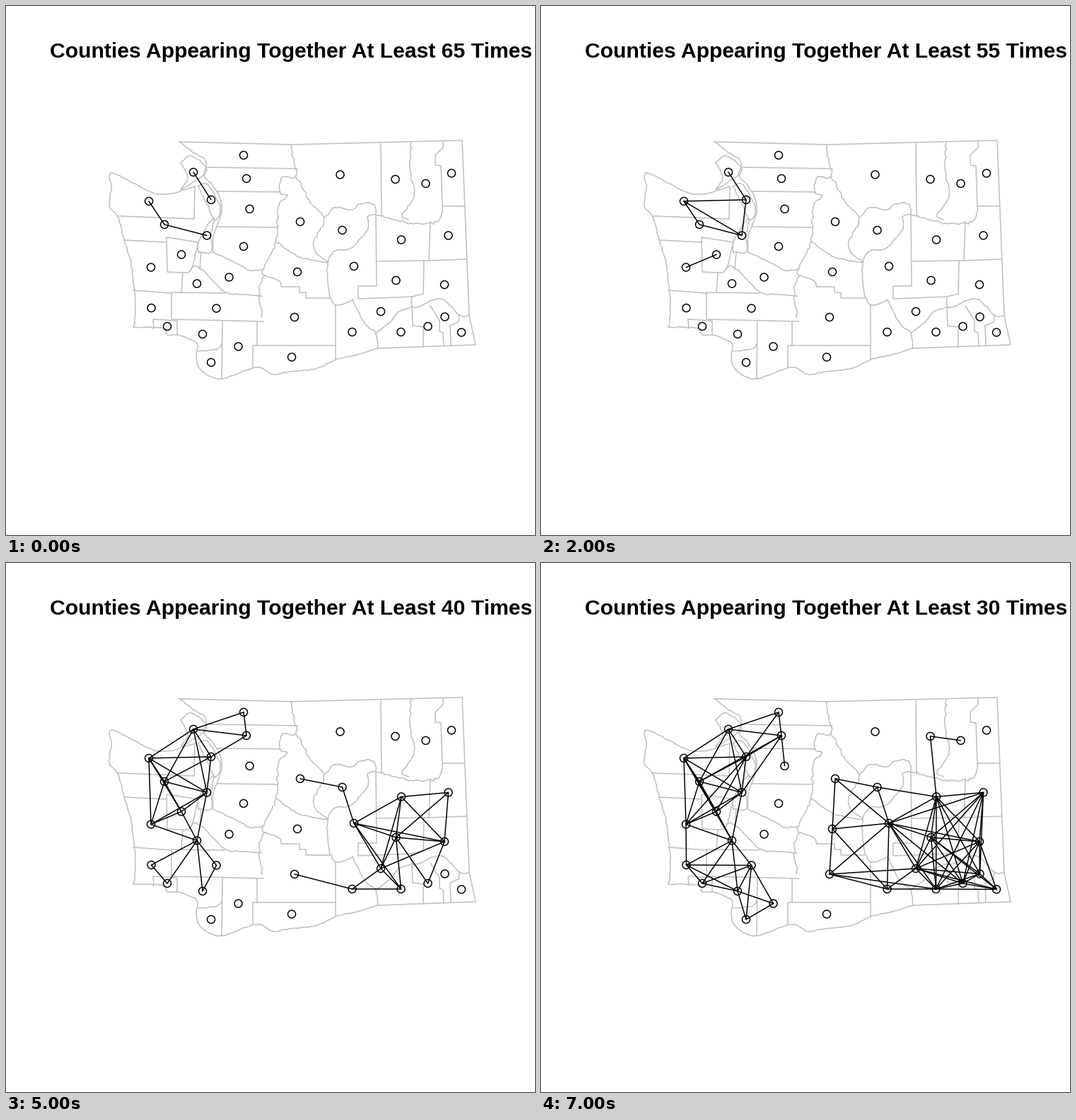
These frames come from a looping animation (748 by 748 pixels, 8 s). A matplotlib script:

```python
from itertools import combinations

import matplotlib.pyplot as plt
import numpy as np
from matplotlib.animation import FuncAnimation
from matplotlib.collections import LineCollection

SIZE = 748
DPI = 100
PX = 72 / DPI
LINE = 1.5 * PX
rng = np.random.default_rng(4)

# County centres, keyed by two-letter codes
NODES = dict(
    Cm=(202, 276), Je=(224, 309), Sj=(265, 235), Is=(290, 274), Ks=(284, 324.5),
    Wt=(336, 211), Sk=(340, 244), Sn=(344.5, 287), Ki=(336, 340), Pi=(315.5, 383.5),
    Ma=(248, 351.5), Gh=(205, 369.5), Th=(270, 392.5), Le=(297.5, 427.5),
    Pa=(205.5, 427), Wk=(228, 453), Co=(278, 464), Ck=(290, 504), Sm=(328.5, 481.5),
    Kl=(404, 496.5), Ya=(408, 440), Kt=(412, 376), Ch=(416, 305), Do=(475.5, 317),
    Gr=(492, 368), Ok=(472.5, 238.5), Fe=(550.5, 245), St=(593.5, 251),
    Po=(630, 236.5), Li=(559, 330.5), Sp=(625.5, 324.5), Ad=(551.5, 388),
    Wm=(620, 394), Fr=(530, 432), Be=(489.5, 461), Ww=(558.5, 461),
    Cb=(596.5, 453), Ga=(620.5, 439.5), As=(644, 461.5),
)

# Groups that become fully linked at each threshold
GROUPS = {
    65: "Sj-Is Cm-Je Je-Ks",
    60: "Cm-Is Is-Ks",
    55: "Cm-Is-Ks Gh-Ma",
    50: "Cm-Sj-Is-Je-Ks Je-Ma-Ks Le-Co Ad-Li Ad-Fr Ad-Wm",
    45: "Je-Gh-Ma-Ks Gh-Ma-Th Ks-Th Sj-Sk-Is Cm-Ma Th-Le Pa-Wk Ch-Do "
        "Gr-Li-Ad Gr-Fr-Ad Li-Wm-Ad Ad-Sp Be-Fr Fr-Ww Ya-Be",
    40: "Wt-Sj-Sk Cm-Gh Th-Pa-Wk Th-Co Do-Gr Li-Sp-Wm Li-Fr Gr-Wm-Fr Gr-Ww "
        "Ad-Ww Ad-Cb-Wm Be-Ww",
    35: "Wt-Is Sk-Sn Sk-Ks Cm-Th Pa-Wk-Co Ch-Kt-Do Kt-Gr Do-Li Gr-Sp-Fr Gr-Be "
        "Ya-Fr Li-Ww Sp-Cb-Ga Wm-Ga Wm-Ww-Cb Fr-Cb Ad-Ga",
    30: "Sk-Je Is-Ma Is-Gh Gh-Pa Pa-Wk-Le Le-Sm-Ck-Co Ch-Gr Kt-Ya-Be Ya-Gr "
        "Ya-Ww Gr-Cb Fe-St Fe-Li Li-Sp-Ad-Wm-Fr-Ww-Cb-Ga Ad-Wm-Fr-Ww-Cb-Ga-As",
}
LEVELS = list(GROUPS)

fig = plt.figure(figsize=(SIZE / DPI, SIZE / DPI), dpi=DPI, facecolor="white")
ax = fig.add_axes([0, 0, 1, 1])
ax.set_xlim(0, SIZE)
ax.set_ylim(SIZE, 0)
ax.axis("off")


def border(*pts):
    """Draw a surveyed line with straight sides."""
    ax.plot(*zip(*pts), color="#bebebe", lw=LINE, zorder=1, solid_joinstyle="round")


def winding(*pts, rough=0.7):
    """Draw a shore, river or ridge: a spline through pts with seeded jitter."""
    p = np.array([pts[0], *pts, pts[-1]], float)
    path = [p[1]]
    for a, b, c, d in zip(p, p[1:], p[2:], p[3:]):
        steps = max(2, round(np.hypot(*(c - b)) / 4))
        for t in np.arange(1, steps + 1) / steps:
            point = 0.5 * (2 * b + (c - a) * t + (2 * a - 5 * b + 4 * c - d) * t**2
                           + (3 * b - a - 3 * c + d) * t**3)
            path.append(point + rng.uniform(-rough, rough, 2) * (t < 1))
    border(*path)


def ridge(*pts):
    winding(*pts, rough=1.5)


# State outline
border((245, 192), (404, 196), (645, 190), (655, 438), (664, 479), (526, 484))
winding((526, 484), (500, 492), (466, 500), (438, 513), (400, 517), (378, 521),
        (354, 511), (304, 527), (276, 515), (269, 493), (270, 477), (243, 465),
        (228, 465), (222, 456), (180, 454))
winding((180, 454), (183, 430), (178, 370), (167, 330), (158, 298), (146, 283),
        (149, 258), (150, 236), (200, 261), (228, 266), (267, 255))

# Islands and the sound
winding((245, 192), (262, 205), (281, 217), (283, 228))
winding((247, 222), (262, 212), (284, 232), (262, 251), (247, 259), (257, 243),
        (247, 222))
winding((272, 255), (285, 252), (303, 285), (296, 303), (284, 280), (272, 255))
winding((272, 348), (272, 333), (293, 300), (290, 325), (290, 348), (272, 348))
winding((283, 228), (280, 240), (298, 262), (305, 290), (293, 325), (293, 348))

# Coast and lowlands
border((267, 255), (266, 301), (159, 297))
border((167, 331), (227, 334))
border((248, 405), (250, 377), (228, 376), (227, 327), (272, 334))
winding((272, 334), (262, 372), (250, 377))
winding((262, 372), (268, 367), (283, 378), (309, 404), (333, 408), (362, 410))
border((276, 348), (274, 372))
border((180, 402), (234, 406), (234, 443), (364, 446))
border((234, 405), (309, 406))
border((209, 456), (208, 443), (242, 445), (242, 465))
winding((272, 488), (299, 485), (305, 477))
border((306, 446), (305, 527))

# Cascades
border((283, 228), (412, 230))
border((298, 262), (388, 263))
border((299, 312), (383, 313))
winding((293, 348), (330, 366), (345, 374), (363, 372))
ridge((402, 196), (410, 240), (391, 241), (388, 265), (398, 268), (385, 285),
      (382, 333), (362, 375), (366, 381), (358, 400), (362, 440))
winding((382, 333), (415, 355), (455, 363))
ridge((410, 240), (432, 280), (450, 300), (435, 340), (455, 363))
winding((366, 381), (385, 388), (390, 397))
border((390, 397), (415, 397), (415, 405), (424, 405), (424, 413), (458, 413))
border((355, 446), (355, 480))
border((349, 511), (349, 480), (466, 480))
border((466, 423), (466, 500))

# Central plateau
ridge((450, 300), (465, 285), (490, 288), (500, 280), (520, 280), (523, 293))
winding((523, 295), (511, 298), (512, 315), (487, 343), (466, 346), (455, 363),
        (456, 400), (466, 423), (490, 415))
border((523, 295), (524, 396), (498, 396), (498, 414), (574, 411))
winding((490, 415), (508, 450), (523, 463), (526, 484))
winding((523, 463), (545, 445), (555, 432), (575, 425))

# East
border((530, 195), (531, 298))
ridge((573, 193), (572, 235), (577, 268), (560, 295), (569, 302))
ridge((523, 295), (556, 304), (577, 308), (610, 305), (617, 283))
border((618, 192), (618, 200), (607, 211), (607, 225), (615, 226), (617, 283),
       (648, 283))
border((600, 305), (598, 360))
border((524, 361), (598, 360), (651, 358))
border((591, 360), (590, 407), (574, 411))
winding((574, 411), (577, 427), (615, 414), (641, 437), (655, 438))
border((574, 425), (575, 452), (590, 454), (590, 482))
border((600, 424), (613, 445), (613, 460), (618, 462), (619, 481))
border((641, 437), (640, 447), (628, 452), (629, 480))

for spot in NODES.values():
    ax.add_patch(plt.Circle(spot, 5.5, fill=False, ec="black", lw=LINE, zorder=3))
links = LineCollection([], colors="black", linewidths=LINE, zorder=2,
                       capstyle="round")
ax.add_collection(links)
title = ax.text(403.5, 73, "", ha="center", va="baseline", fontsize=30.1 * PX,
                fontname="Liberation Sans", fontweight="bold", color="black")


def draw(step):
    words = " ".join(GROUPS[level] for level in LEVELS[:step + 1]).split()
    pairs = {pair for word in words
             for pair in combinations(sorted(word.split("-")), 2)}
    links.set_segments([(NODES[a], NODES[b]) for a, b in sorted(pairs)])
    title.set_text(f"Counties Appearing Together At Least {LEVELS[step]} Times")
    return links, title


anim = FuncAnimation(fig, draw, frames=len(LEVELS), interval=1000, repeat=True,
                     repeat_delay=0, blit=False)
plt.show()
```
